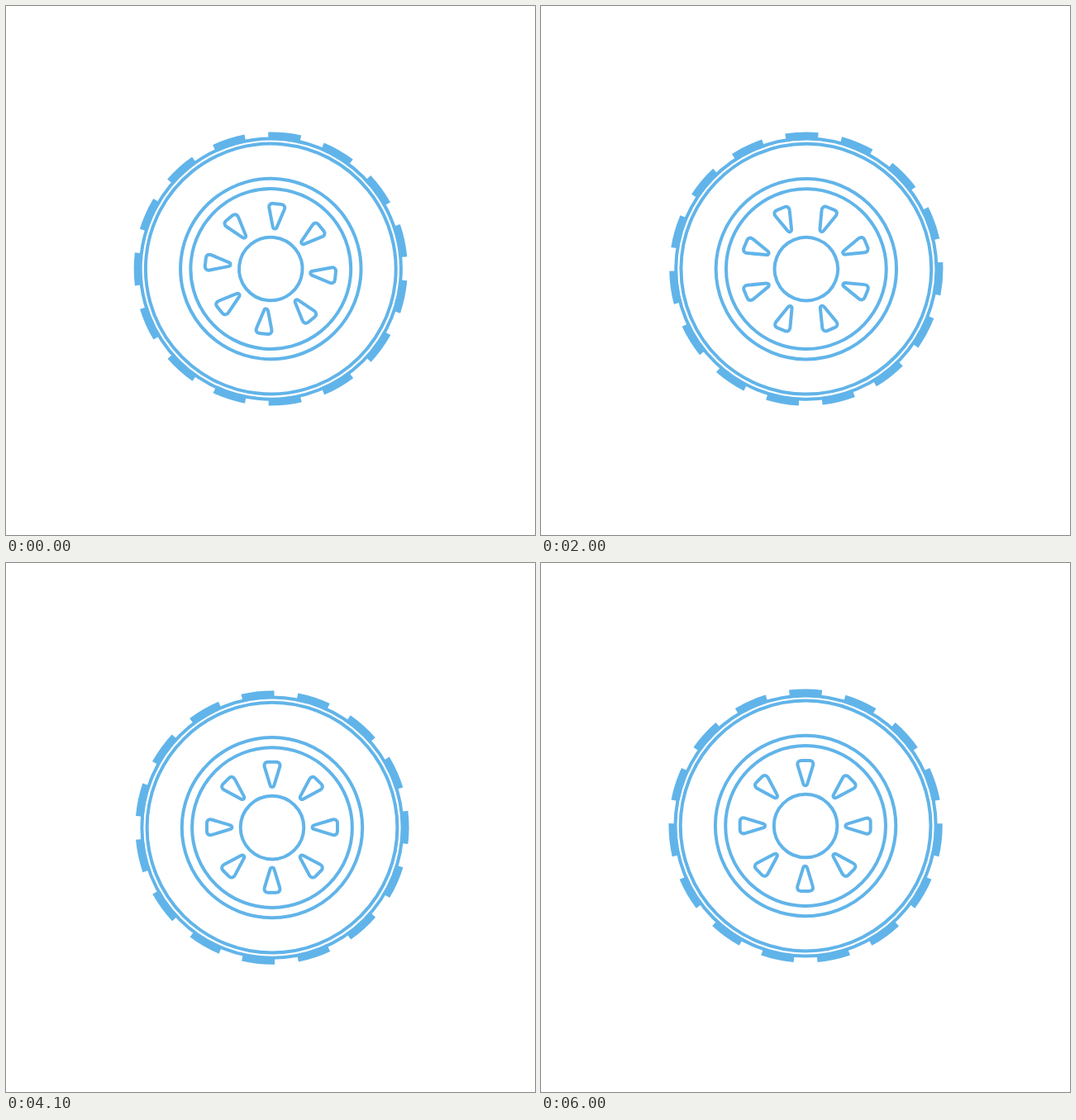
Write an HTML page without scripts that moves like this. It is 640 px wide and 640 px high and loops after 8000 ms.

```html
<!DOCTYPE html>
<html lang="en">
<head>
<meta charset="utf-8">
<title>Spinning wheel</title>
<style>
  @property --turns { syntax: "<number>"; inherits: false; initial-value: 0; }

  html, body { margin: 0; width: 100%; height: 100%; overflow: hidden; background: #fff; }
  svg { display: block; width: 100%; height: 100%; }

  /* Each turn is a steady quarter rotation, a short rest, then a snap back */
  .wheel {
    fill: none;
    stroke: #61b4e9;
    stroke-width: 4;
    stroke-linejoin: round;
    transform: rotate(calc(90deg * min(1, 1.2 * mod(var(--turns), 1))));
    animation: spin 8s linear infinite;
  }
  .tread { stroke-width: 8.4; stroke-dasharray: 14 10; stroke-dashoffset: 1.1; }

  /* Pace of the turns, then a long stop */
  @keyframes spin {
    from { --turns: .054; }
    15% { --turns: 2.06; }
    25% { --turns: 3.204; }
    40% { --turns: 5.278; }
    51.25% { --turns: 6.9; }
    66.25% { --turns: 8.9; }
    75%, to { --turns: 10.001; }
  }
</style>
</head>
<body>
<svg viewBox="0 0 640 640">
  <defs>
    <path id="slot" d="M-5-79H5C8.6-79 10.2-76 9.2-73L2.5-51C1.6-47.9-1.6-47.9-2.5-51L-9.2-73C-10.2-76-8.6-79-5-79Z"/>
    <g id="pair">
      <use href="#slot"/>
      <use href="#slot" transform="rotate(180)"/>
    </g>
    <g id="cross">
      <use href="#pair"/>
      <use href="#pair" transform="rotate(90)"/>
    </g>
  </defs>
  <g transform="translate(320 320)">
    <g class="wheel">
      <!-- The hub sits slightly off the pivot -->
      <g transform="translate(.1 -2)">
        <circle class="tread" r="161.4" pathLength="360"/>
        <circle r="157.6"/>
        <circle r="151.4"/>
        <circle r="109.2"/>
        <circle r="96.9"/>
        <circle r="38.3"/>
        <g transform="translate(-.4)">
          <use href="#cross"/>
          <use href="#cross" transform="rotate(45)"/>
        </g>
      </g>
    </g>
  </g>
</svg>
</body>
</html>
```
